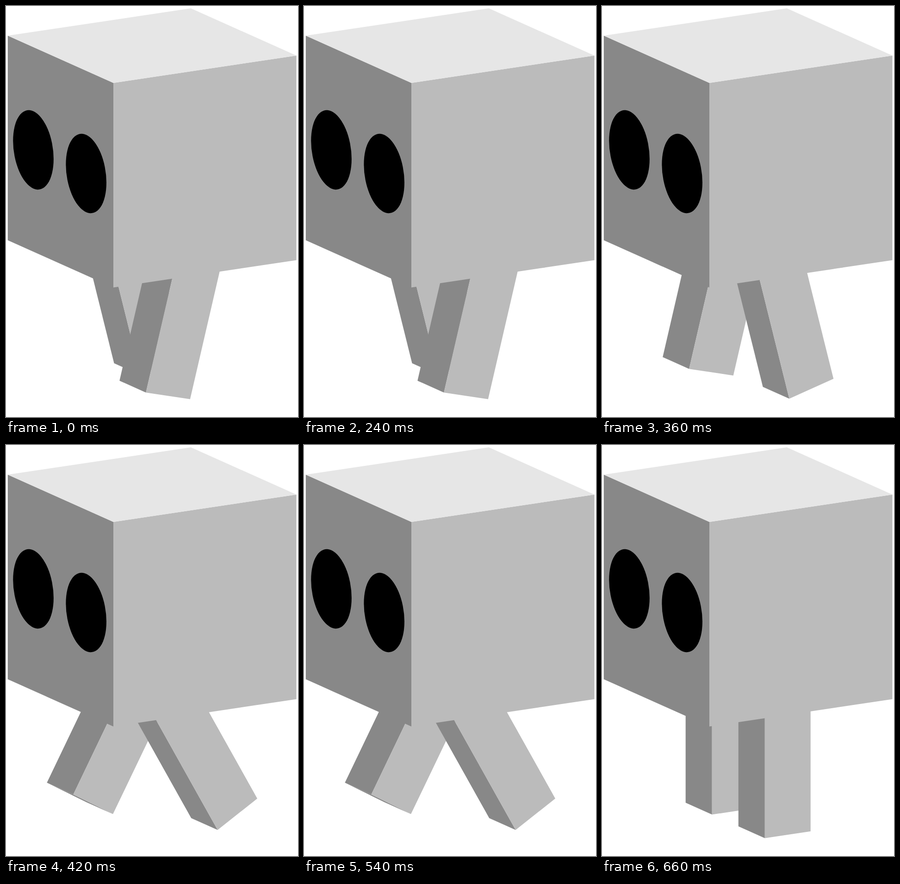
An HTML page for the animation above (0.72 s loop, 631 px wide and 887 px high).

```html
<!DOCTYPE html>
<html lang="en">
<head>
<meta charset="utf-8">
<title>Walking cube</title>
<style>
  html, body { margin: 0; width: 100%; height: 100%; overflow: hidden; background: #fff; }
  svg { display: block; width: 100vw; height: 100vh; }
</style>
</head>
<body>
<svg id="stage" viewBox="0 0 631 887"></svg>
<script>
const stage = document.getElementById('stage');
const DARK = '#888', MID = '#bbb', LIGHT = '#e6e6e6';

// Orthographic projection: one unit is the side of the cube,
// a runs front to back, b near to far, c downwards.
const O = [232, 166], A = [395.6, -59], B = [-228.2, -102], C = [0, 441.5];
const project = ([a, b, c]) =>
  [0, 1].map(i => O[i] + a * A[i] + b * B[i] + c * C[i]);
const outline = pts =>
  pts.map(p => project(p).map(n => n.toFixed(2)).join()).join(' ');

function add(tag, attrs) {
  const el = document.createElementNS('http://www.w3.org/2000/svg', tag);
  for (const k in attrs) el.setAttribute(k, attrs[k]);
  return stage.appendChild(el);
}
const face = (fill, pts = []) => add('polygon', { fill, points: outline(pts) });

const HALF = 0.125, UP = 0.3, DOWN = 0.5, PIVOT = [0.5, 1.125];

function makeLeg(b) {
  const sole = face(DARK), front = face(DARK), side = face(MID);
  return deg => {
    const r = deg * Math.PI / 180, sin = Math.sin(r), cos = Math.cos(r);
    const at = (x, y, z) =>
      [PIVOT[0] + x * cos + y * sin, z, PIVOT[1] - x * sin + y * cos];
    const near = b, far = b + 2 * HALF;
    const draw = (el, pts) => el.setAttribute('points', outline(pts));
    draw(front, [at(-HALF, -UP, near), at(-HALF, DOWN, near),
                 at(-HALF, DOWN, far), at(-HALF, -UP, far)]);
    draw(side, [at(-HALF, -UP, near), at(HALF, -UP, near),
                at(HALF, DOWN, near), at(-HALF, DOWN, near)]);
    // The sole only turns towards the viewer on a wide forward swing.
    draw(sole, deg > -28 ? [] : [at(-HALF, DOWN, near), at(HALF, DOWN, near),
                                 at(HALF, DOWN, far), at(-HALF, DOWN, far)]);
  };
}

function makeEye(b) {
  const [x, y] = project([-0.0045, b, 0.5]);
  add('ellipse', {
    rx: 0.192, ry: 0.189,
    transform: `matrix(${[...B, ...C, x, y]})`
  });
}

const farLeg = makeLeg(0.625);
const nearLeg = makeLeg(0.125);

face(MID, [[0, 0, 0], [1, 0, 0], [1, 0, 1], [0, 0, 1]]);
face(DARK, [[0, 0, 0], [0, 1, 0], [0, 1, 1], [0, 0, 1]]);
face(LIGHT, [[0, 0, 0], [1, 0, 0], [1, 1, 0], [0, 1, 0]]);
makeEye(0.75);
makeEye(0.25);

// Triangle-wave stride: twelve poses of 60 ms, 15 degrees apart.
function render(ms) {
  const step = Math.floor(ms / 60) % 12;
  const swing = 15 * (3 - Math.abs((step + 10) % 12 - 6));
  nearLeg(swing);
  farLeg(-swing);
}

const start = performance.now();
function tick() {
  render(performance.now() - start);
  requestAnimationFrame(tick);
}
tick();
</script>
</body>
</html>
```
